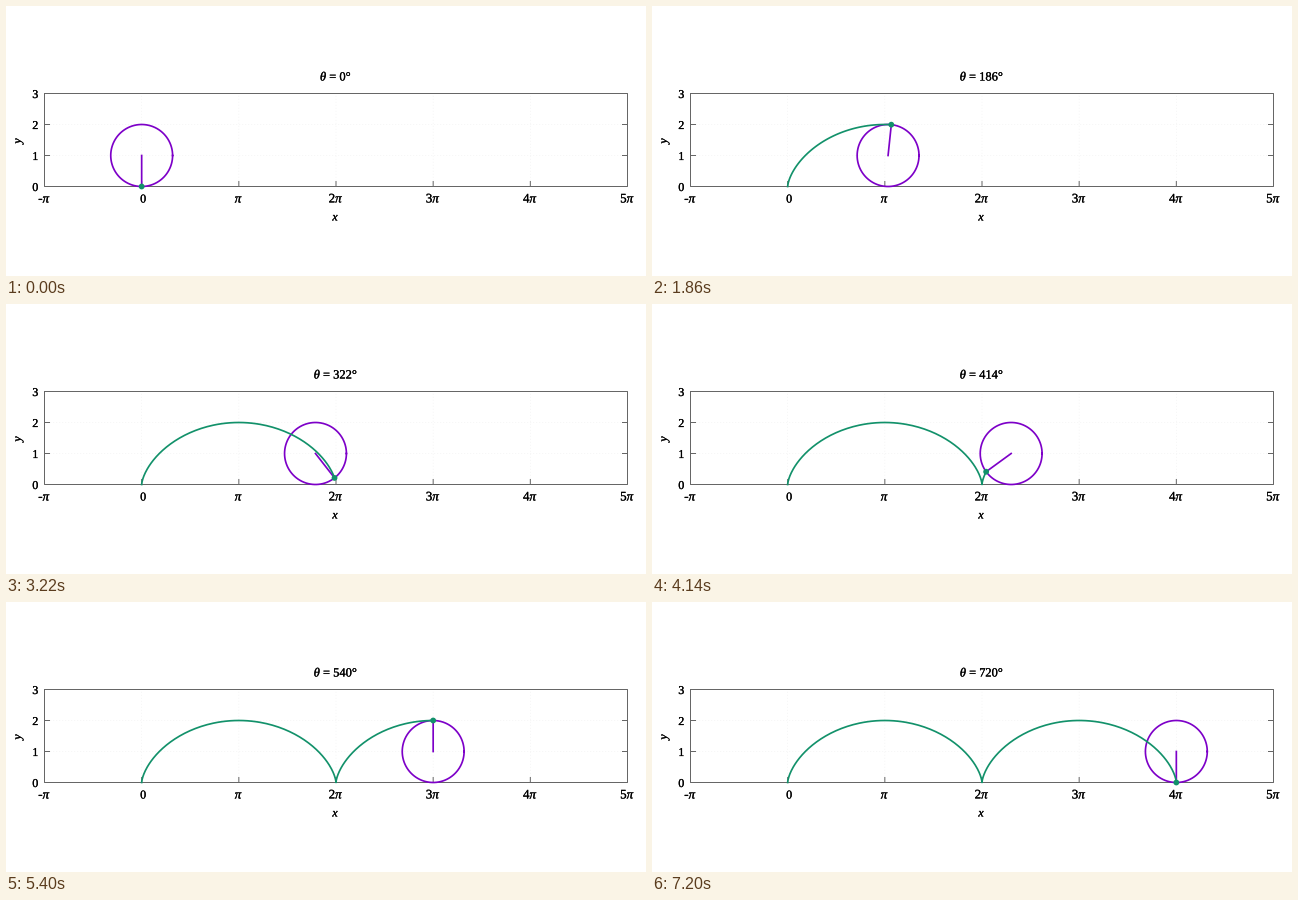
A matplotlib script that plays this animation: 640x270 px, repeating every 7.22 s.

```python
import numpy as np
import matplotlib.pyplot as plt
from matplotlib.animation import FuncAnimation
from matplotlib.patches import Circle
from matplotlib.patheffects import withStroke

W, H, DPI = 640, 270, 80
PX = 72 / DPI                       # one pixel in points
LEFT, RIGHT, TOP, BOTTOM = 38.5, 621.5, 87.5, 180.5
FRAMES, STEP = 361, 2               # degrees per frame
PURPLE, GREEN, INK = "#7d00c8", "#12916a", "#000000"

plt.rcParams.update({
    "font.family": "Liberation Serif",
    "mathtext.fontset": "custom",
    "mathtext.rm": "Liberation Serif",
    "mathtext.it": "Liberation Serif:italic",
    "text.hinting": "none",
    "path.snap": False,
})

fig = plt.figure(figsize=(W / DPI, H / DPI), dpi=DPI, facecolor="white")
ax = fig.add_axes([0, 0, 1, 1])
ax.set(xlim=(0, W), ylim=(H, 0))
ax.axis("off")


def sx(x):
    return LEFT + (x / np.pi + 1) * (RIGHT - LEFT) / 6


def sy(y):
    return BOTTOM - y * (BOTTOM - TOP) / 3


def line(xs, ys, color, width, **kw):
    return ax.plot(xs, ys, color=color, lw=width * PX, **kw)[0]


def label(x, y, s, size=12, **kw):
    kw = {"ha": "center", "va": "baseline", **kw}
    bolder = [withStroke(linewidth=0.25 * PX, foreground=INK)]
    return ax.text(x, y, s, fontsize=size * PX, color=INK,
                   path_effects=bolder, **kw)


def draw_axes():
    frame = dict(color="#666666", width=1, zorder=2)
    dots = dict(color="#e6e6e6", width=0.6, dashes=(1, 4), zorder=1)
    line([LEFT, RIGHT, RIGHT, LEFT, LEFT],
         [TOP, TOP, BOTTOM, BOTTOM, TOP], **frame)

    for k in range(-1, 6):
        x = sx(k * np.pi)
        if -1 < k < 5:
            line([x, x], [BOTTOM, TOP], **dots)
            line([x, x], [BOTTOM, BOTTOM - 5], **frame)
        num = {-1: "-", 1: ""}.get(k, str(k))
        if k == 0:
            label(x + 1.5, 196.5, "0")
        else:
            label(x + 0.3, 196.5, num + r"$\pi$", 13)

    for k in range(4):
        y = sy(k)
        if 0 < k < 3:
            line([LEFT, RIGHT], [y, y], **dots)
            line([LEFT, LEFT + 5], [y, y], **frame)
            line([RIGHT, RIGHT - 5], [y, y], **frame)
        label(32.3, y + 4.5, str(k), ha="right")

    label(330, 214.5, "$x$")
    label(13.5, 133.5, "$y$", va="center", rotation=90)


draw_axes()
title = label(330, 74.5, "", 12.5)
circle = line([], [], PURPLE, 1.7, zorder=3)
spoke = line([], [], PURPLE, 1.7, zorder=3)
trail = line([], [], GREEN, 1.7, zorder=4)
dot = ax.add_patch(Circle((0, 0), 2.9, fc=GREEN, lw=0, zorder=5))

turn = np.linspace(0, 2 * np.pi, 181)


def update(i):
    t = np.radians(np.arange(i + 1) * STEP)
    x, y = sx(t - np.sin(t)), sy(1 - np.cos(t))
    c = t[-1]
    circle.set_data(sx(c + np.cos(turn)), sy(1 + np.sin(turn)))
    spoke.set_data([sx(c), x[-1]], [sy(1), y[-1]])
    trail.set_data(x, y)
    dot.center = x[-1], y[-1]
    title.set_text(rf"$\theta$ = {i * STEP}°")
    return circle, spoke, trail, dot, title


anim = FuncAnimation(fig, update, frames=FRAMES, interval=20,
                     repeat=True, repeat_delay=0, blit=False)
plt.show()
```
